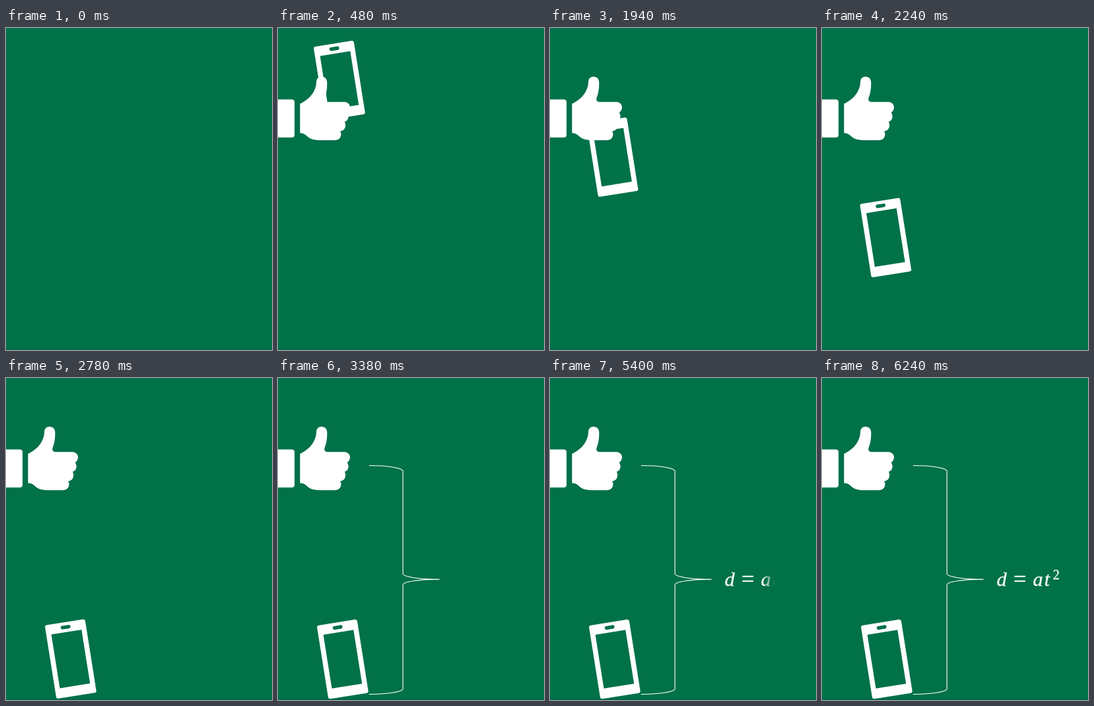
Recreate the animation shown at these times as an HTML page. Size 396 by 480 pixels, loop 6570 ms.

```html
<!DOCTYPE html>
<html lang="en">
<head>
<meta charset="utf-8">
<title>Falling phone</title>
<style>
  html, body { margin: 0; width: 100%; height: 100%; overflow: hidden; background: #007148; }
  svg { display: block; width: 100%; height: 100%; }
  text { font: italic 30px "Liberation Serif", "Times New Roman", serif; }
  .sign { font: 34px "Liberation Serif", "Times New Roman", serif; }
  .power { font: 20px "Liberation Serif", "Times New Roman", serif; }
</style>
</head>
<body>
<svg viewBox="0 0 396 480" fill="#fff">
  <defs>
    <linearGradient id="wipe" gradientUnits="userSpaceOnUse" y1="0" y2="0">
      <stop offset="0" stop-color="#fff"/>
      <stop offset="1" stop-color="#fff" stop-opacity="0"/>
    </linearGradient>
  </defs>
  <rect width="396" height="480" fill="#007148"/>
  <rect y="478" width="396" height="2" fill="#006b45"/>
  <g id="scene">
    <path d="M0 106.5H20.5Q24.6 106.5 24.6 110.6V159.2Q24.6 163.3 20.5 163.3H0Z"/>
    <path d="M32.8 113C47 106.500 57 94 57.200 80C57.200 75.500 60.500 72.500 65 72.500
      C70 72.500 73.200 76 73.200 82C73.200 92 71.500 99 69.300 104.500C68.300 107.500 70.500 110.200 73.500 110.200
      H99C104 110.200 107.200 114 107.200 118C107.200 121.500 105.500 124.500 103 126
      C104.300 128 104.800 130 104.800 132C104.800 136 102.500 139 99 139.800
      C100.200 141.500 100.600 143.500 100.400 146C100 150.500 97 153.200 92.500 154
      C93.600 155.500 94 157 93.800 159C93.500 164 90 167.200 85 167.200
      H61C53 167.200 47 165 43.500 161.500C40.500 158.500 38 156.800 32.800 156.800Z"/>
    <path id="phone" fill-rule="evenodd"/>
  </g>
  <path id="brace" fill="none" stroke="#fff" stroke-width="1.1"
    d="M135.500 130.500A50.500 8.300 0 0 1 186 138.800V291.800A54.500 8.300 0 0 0 240.500 300.100A54.500 8.300 0 0 0 186 308.400V463.200A50.500 8.300 0 0 1 135.500 471.500"/>
  <g fill="url(#wipe)" stroke="url(#wipe)" stroke-width=".3">
    <text x="260" y="310">d</text>
    <text class="sign" x="285" y="310.600">=</text>
    <text x="314" y="310">a</text>
    <text x="331" y="310">t</text>
    <text class="power" x="343.700" y="299.500">2</text>
  </g>
</svg>
<script>
  const LOOP = 6570, STEP = 60;
  const runs = [[0, 480], [1280, 3380], [3780, 6240]];
  const el = id => document.getElementById(id);
  const scene = el('scene'), phone = el('phone'), brace = el('brace'), wipe = el('wipe');

  const clamp = v => Math.min(1, Math.max(0, v));
  const progress = (t, start, length) => clamp((t - start) / length);
  const smooth = u => u * u * u * (10 - 15 * u + 6 * u * u);

  // Rounded rectangle centred on (0, cy)
  function box(w, h, r, cy = 0) {
    const arc = (x, y) => `a${r} ${r} 0 0 1 ${x * r} ${y * r}`;
    const a = w - 2 * r, b = h - 2 * r;
    return `M${r - w / 2} ${cy - h / 2}h${a}${arc(1, 1)}v${b}${arc(-1, 1)}` +
      `h${-a}${arc(-1, -1)}v${-b}${arc(1, -1)}z`;
  }
  phone.setAttribute('d', box(60.5, 111, 3) + box(45.5, 81.2, 0.2) + box(14.5, 5.4, 2.4, -48));

  // Motion advances in fixed steps and rests between runs
  function hold(t) {
    const [from, to] = runs.filter(r => r[0] <= t).pop();
    return from + Math.floor((Math.min(t, to) - from) / STEP) * STEP;
  }

  function draw(time) {
    const t = hold(time % LOOP);
    const fall = smooth(progress(t, 1300, 1560));
    const edge = 296 + (t - 4500) * 0.0432;
    scene.setAttribute('opacity', progress(t, 0, 480));
    phone.setAttribute('transform', `translate(${91.4 + 4.9 * fall} ${78.2 + 341 * fall}) rotate(-9)`);
    brace.setAttribute('opacity', progress(t, 2860, 520));
    wipe.setAttribute('x1', edge - 18);
    wipe.setAttribute('x2', edge);
  }

  const begin = performance.now();
  function tick() {
    draw(performance.now() - begin);
    requestAnimationFrame(tick);
  }
  tick();
</script>
</body>
</html>
```
